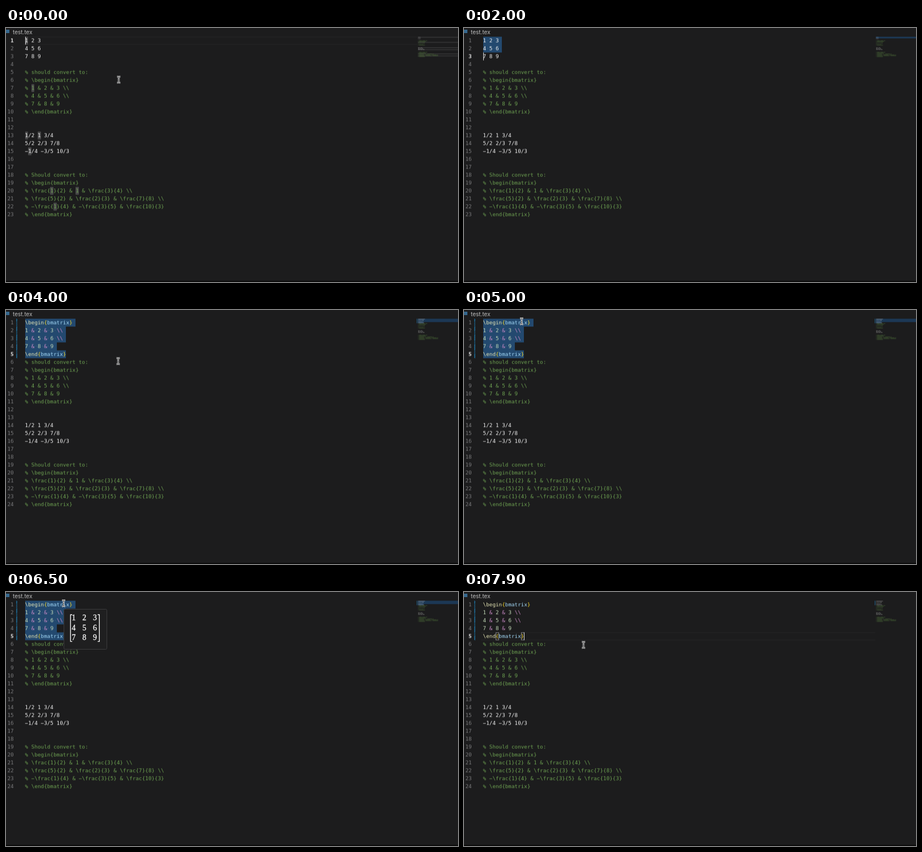
An HTML page that plays this animation: 800x450 px, repeating every 8 s.

```html
<!DOCTYPE html>
<html lang="en">
<head>
<meta charset="utf-8">
<title>test.tex</title>
<style>
html, body { margin: 0; width: 100%; height: 100%; overflow: hidden; background: #1c1c1d; }
#stage { position: absolute; left: 0; top: 0; width: 800px; height: 450px; overflow: hidden; background: #1c1c1d; }
#stage div, #stage svg { position: absolute; }
.icon { left: 0; top: 3px; width: 6px; height: 6px; background: #35688f; }
.title { left: 12px; top: 1px; font: 10px/13px Inter, sans-serif; color: #bcbcbc; }
.foot { left: 0; top: 448px; width: 800px; height: 2px; background: #0b0b0b; }
.layer { left: 0; top: 0; width: 800px; height: 450px; }
.doc { transform: translateY(.4px); }
.line { left: 33.6px; height: 14px; white-space: pre; color: #f4f4f4; }
.line, .num { font: 9.3px/14px "DejaVu Sans Mono", monospace; }
.num { left: 0; width: 13.6px; text-align: right; color: #7c7c7e; }
.num.active { color: #d8d8d8; font-weight: bold; }
.comment { color: #6fa353; }
.cmd { color: #e8e8b6; }
.brace { color: #fadb2a; }
.env { color: #a6dcfa; }
.op { color: #cc8cc8; }
.digit { color: #c6dcba; }
.dots { color: rgba(227, 228, 226, .2); }
.sel { height: 14px; background: #23496f; }
.word { width: 5.6px; height: 14px; background: #474748; border-radius: 1px; }
.row { left: 30px; width: 698px; height: 12px; border: solid #272728; border-width: 1px 0; }
.match { width: 4px; height: 12px; border: 1px solid #858585; }
.caret { width: 1px; height: 14px; background: #dcdcdc; }
.band { left: 729px; height: 1.6px; }
.mod { left: 17.5px; top: 15px; width: 2.4px; height: 70px;
  background: repeating-linear-gradient(-45deg, #1f709c 0 1px, #1b3443 1px 2px); }
.mapmod { left: 727px; top: 15px; width: 1px; height: 8px; background: #1f5f86; }
.popup { left: 101.5px; top: 29.5px; width: 75px; height: 70px; border: 1px solid #3c3c3d;
  border-radius: 2.5px; background: #1f1f20; }
.popup text { font: 13.6px "Liberation Serif", serif; fill: #f4f4f4; stroke: #f4f4f4; stroke-width: .35px; text-anchor: middle; }
.mouse { left: -5px; top: -8px; animation: move 8s infinite; }
@keyframes move {
  0%, 21.25% { transform: translate(199.5px, 91.5px); animation-timing-function: step-end; }
  48.5% { transform: translate(199.5px, 91.5px); }
  50% { transform: translate(198.5px, 90.5px); animation-timing-function: ease-in-out; }
  60%, 86.25% { transform: translate(102px, 20px); animation-timing-function: ease-in-out; }
  93%, 100% { transform: translate(211.5px, 93.6px); }
}
</style>
</head>
<body>
<div id="stage">
  <div class="icon"></div>
  <div class="title">test.tex</div>
  <div class="foot"></div>
</div>
<script>
const LOOP = 8000, X0 = 33.6, Y0 = 15, CW = 5.6, LH = 14;
const MAP_X = 729.5, MAP_CW = .8, MAP_LH = 1.57;
const stage = document.getElementById('stage');
const rules = document.head.appendChild(document.createElement('style'));
let count = 0;

const x = col => X0 + col * CW;
const y = row => Y0 + row * LH;

function add(parent, cls, style = {}, text = '') {
  const el = document.createElement('div');
  el.className = cls;
  el.textContent = text;
  for (const k in style) el.style[k] = typeof style[k] === 'number' ? style[k] + 'px' : style[k];
  return parent.appendChild(el);
}

// Visible only during the given [start, end] spans, in ms.
function show(el, ...spans) {
  const name = 'show' + count++;
  const key = (t, o) => `${t / LOOP * 100}% { opacity: ${o}; }`;
  const keys = spans.map(([a, b]) => key(a, 1) + (b < LOOP ? key(b, 0) : '')).join(' ');
  rules.append(`@keyframes ${name} { ${key(0, 0)} ${keys} }\n`);
  el.style.animation = `${name} ${LOOP}ms step-end infinite`;
  return el;
}

const layer = (parent, ...spans) => show(add(parent, 'layer'), ...spans);
const caret = (parent, row, col, ...spans) =>
  show(add(parent, 'caret', { left: x(col), top: y(row) }), ...spans);
const active = (parent, row) => add(parent, 'num active', { top: y(row) }, row + 1);
const band = (parent, row, color, width = 71) =>
  add(parent, 'band', { top: Y0 + row * MAP_LH, background: color, width });

// A selected line break widens the row and fills its minimap row.
function select(parent, row, text, newline) {
  add(parent, 'sel', { left: X0, top: y(row), width: (text.length + newline) * CW });
  add(parent, 'line dots', { top: y(row) }, text.replace(/./g, c => c === ' ' ? '·' : ' '));
  band(parent, row, '#1c3855', newline ? 71 : text.length * MAP_CW);
}

function paint(el, text) {
  const kinds = ['cmd', 'brace', 'env', 'op', 'digit'];
  el.textContent = '';
  for (const m of text.matchAll(/(\\begin|\\end)|([{}])|(bmatrix)|(&|\\\\)|(\d)|./g)) {
    const span = document.createElement('span');
    span.className = kinds[m.slice(1).findIndex(Boolean)] || '';
    span.textContent = m[0];
    el.append(span);
  }
}

function minimap(parent, lines) {
  const paths = { '#e0e0e0': '', '#6ea04e': '' };
  lines.forEach((text, i) => {
    const color = text[0] === '%' ? '#6ea04e' : '#e0e0e0';
    for (const m of text.matchAll(/\S+/g))
      paths[color] += `M${MAP_X + m.index * MAP_CW} ${Y0 + .8 + i * MAP_LH}h${m[0].length * MAP_CW}`;
  });
  parent.insertAdjacentHTML('beforeend', '<svg width="800" height="60" style="left:0;top:0">' +
    Object.entries(paths).map(([c, d]) => `<path d="${d}" stroke="${c}" stroke-opacity=".4"/>`).join('') + '</svg>');
}

function write(parent, lines, colored = 0) {
  lines.forEach((text, i) => {
    add(parent, 'num', { top: y(i) }, i + 1);
    const el = add(parent, 'line' + (text[0] === '%' ? ' comment' : ''), { top: y(i) }, text);
    if (i < colored) paint(el, text);
  });
  minimap(parent, lines);
}

const before = String.raw`1 2 3
4 5 6
7 8 9

% should convert to:
% \begin{bmatrix}
% 1 & 2 & 3 \\
% 4 & 5 & 6 \\
% 7 & 8 & 9
% \end{bmatrix}


1/2 1 3/4
5/2 2/3 7/8
−1/4 −3/5 10/3


% Should convert to:
% \begin{bmatrix}
% \frac{1}{2} & 1 & \frac{3}{4} \\
% \frac{5}{2} & \frac{2}{3} & \frac{7}{8} \\
% −\frac{1}{4} & −\frac{3}{5} & \frac{10}{3}
% \end{bmatrix}`.split('\n');
const matrix = before.slice(5, 10).map(s => s.slice(2));
const after = [...matrix, ...before.slice(4)];

// Plain rows, selected one by one
const CONVERT = 2800, KEYS = [1750, 1950, 2250];
const first = layer(stage, [0, CONVERT]);
first.classList.add('doc');
const idle = layer(first, [0, KEYS[0]]);
add(idle, 'row', { top: y(0) });
for (const [row, col] of [[0, 0], [6, 2], [12, 0], [12, 4], [14, 1], [19, 8], [19, 16], [21, 9]]) {
  add(idle, 'word', { left: x(col), top: y(row) });
  band(idle, row, 'rgba(255,255,255,.09)');
}
KEYS.forEach((t, i) => select(layer(first, [t, CONVERT]), i, before[i], i < 2 ? 1 : 0));
write(first, before);
active(layer(first, [0, KEYS[0]]), 0);
active(layer(first, [KEYS[0], KEYS[1]]), 1);
active(layer(first, [KEYS[1], CONVERT]), 2);
caret(first, 0, 0, [0, 300], [800, 1300]);
caret(first, 1, 0, [KEYS[0], KEYS[1]]);
caret(first, 2, 0, [KEYS[1], KEYS[2]]);
caret(first, 2, 5, [KEYS[2], CONVERT]);

// Converted matrix
const CLEAR = 7500;
const second = layer(stage, [CONVERT, LOOP]);
second.classList.add('doc');
const chosen = layer(second, [CONVERT, CLEAR]);
matrix.forEach((text, i) => select(chosen, i, text, i < 4 ? 1 : 0));
const plain = layer(second, [CLEAR, LOOP]);
add(plain, 'row', { top: y(4) });
for (const col of [4, 12]) add(plain, 'match', { left: x(col), top: y(4) });
write(second, after, 5);
active(second, 4);
const changed = layer(second, [3000, LOOP]);
add(changed, 'mod');
add(changed, 'mapmod');
caret(second, 4, 13, [CONVERT, 3700], [4200, 4700], [5200, 5700], [6200, 6700], [7200, LOOP]);

// Rendered preview
const popup = show(add(stage, 'popup'), [5400, 6900]);
const digits = [...'123456789'].map((d, i) =>
  `<text x="${17 + i % 3 * 18.7}" y="${18.8 + Math.floor(i / 3) * 17.7}">${d}</text>`).join('');
popup.innerHTML = `<svg width="75" height="70" style="left:0;top:0">${digits}
  <path d="M14.2 9.2h-3v47.4h3M59.3 9.2h3v47.4h-3" fill="none" stroke="#f4f4f4" stroke-width="1.4"/></svg>`;

// Text pointer
const beam = 'M2.2 2.6q2.8 0 2.8 1.8q0-1.8 2.8-1.8M5 4v8M2.2 13.4q2.8 0 2.8-1.8q0 1.8 2.8 1.8M3.6 9h2.8';
const pointer = layer(stage, [0, 1700], [3900, LOOP]);
pointer.innerHTML = `<svg class="mouse" width="10" height="16" fill="none">
  <path d="${beam}" stroke="#f2f2f2" stroke-width="2.6"/>
  <path d="${beam}" stroke="#2a2a2a" stroke-width=".8"/></svg>`;
</script>
</body>
</html>
```
